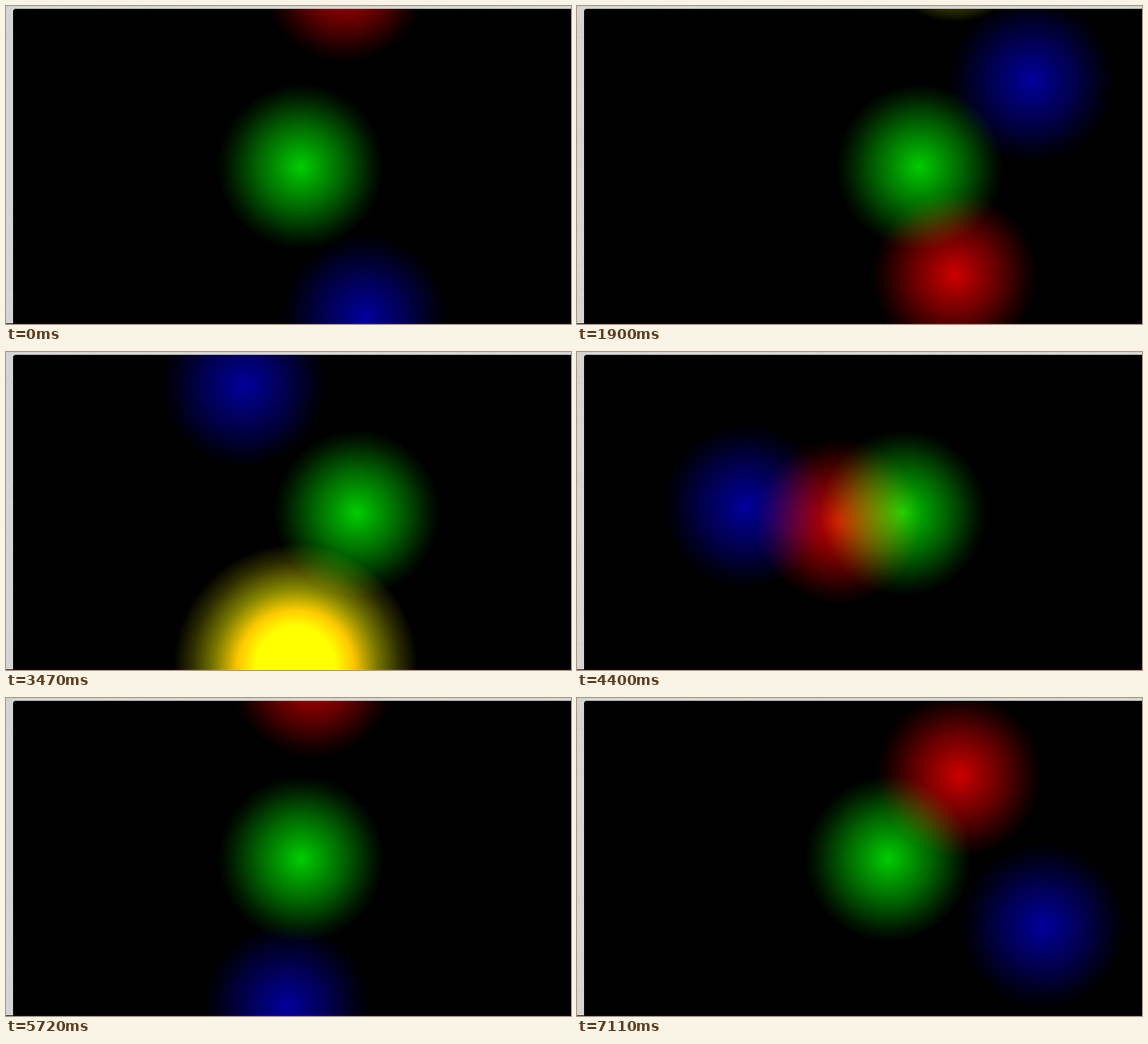
These frames come from a looping animation (800x451 px, 7200 ms). An HTML page with a canvas:

```html
<!DOCTYPE html>
<html lang="en">
<head>
<meta charset="utf-8">
<title>Orbiting lights</title>
<style>
  html, body { margin: 0; width: 100%; height: 100%; overflow: hidden; background: #000; }
  canvas { display: block; width: 800px; height: 451px; }
</style>
</head>
<body>
<canvas id="stage" width="800" height="451"></canvas>
<script>
const ctx = document.getElementById('stage').getContext('2d');
const WIDTH = 800, HEIGHT = 451, LOOP = 7200;
const CENTER = { x: 460, y: 228 };

// Start of every tenth step; the steps between are evenly spaced.
const marks = [70, 830, 1590, 2370, 3150, 3940, 4720, 5510, 6250, 7030, 7810];

function stepAt(time) {
  const t = time + 12;
  if (t < marks[0]) return 0;
  const i = marks.findIndex((start, n) => t >= start && t < marks[n + 1]);
  return 1 + i * 10 + Math.floor((t - marks[i]) / (marks[i + 1] - marks[i]) * 10);
}

function makeBackdrop() {
  const layer = document.createElement('canvas');
  layer.width = WIDTH;
  layer.height = HEIGHT;
  const g = layer.getContext('2d');
  g.fillStyle = '#d3d6d4';
  g.fillRect(0, 0, WIDTH, HEIGHT);

  let seed = 7;
  const random = () => (seed = seed * 16807 % 2147483647) / 2147483647;
  const fleck = (x, y) => {
    const shade = 198 + Math.floor(random() * 26);
    g.strokeStyle = `rgba(${shade},${shade + 2},${shade},0.6)`;
    g.beginPath();
    g.moveTo(x, y);
    g.lineTo(x + 3, y - 2);
    g.stroke();
  };
  for (let i = 0; i < 420; i++) fleck(random() * 10, random() * HEIGHT);
  for (let i = 0; i < 300; i++) fleck(random() * WIDTH, random() * 5);

  g.fillStyle = '#000';
  g.fill(panel);
  g.fillStyle = '#1c0812';
  g.fillRect(0, 450, WIDTH, 1);
  return layer;
}

const panel = new Path2D('M10 451V8Q10 4 14 4H800V451Z');
const backdrop = makeBackdrop();

// Brightness over distance from the middle, both as fractions.
const falloff = [[0, 1], [0.32, 0.68], [0.5, 0.5], [0.85, 0.12], [1, 0]];

function light(x, y, radius, red, green, blue) {
  const gradient = ctx.createRadialGradient(x, y, 0, x, y, radius);
  for (const [distance, level] of falloff) {
    const rgb = [red, green, blue].map(v => Math.min(255, Math.round(v * level)));
    gradient.addColorStop(distance, `rgb(${rgb})`);
  }
  ctx.fillStyle = gradient;
  ctx.beginPath();
  ctx.arc(x, y, radius, 0, Math.PI * 2);
  ctx.fill();
}

function draw(time) {
  const angle = (-77.6 + 4.475 * stepAt(time)) * Math.PI / 180;
  const cos = Math.cos(angle), sin = Math.sin(angle);
  const { x, y } = CENTER;

  ctx.drawImage(backdrop, 0, 0);
  ctx.save();
  ctx.clip(panel);
  ctx.globalCompositeOperation = 'lighter';
  light(x + 44 * sin, y, 118, 0, 205, 0);
  light(x + 90 * cos, y + 272 * sin, 118, 205, 0, 0);
  light(x + 222 * cos, y - 218 * sin, 118, 0, 0, 155);
  // The yellow light shines only while it is in front of the wall.
  if (sin > 0.05) light(x + 90 * cos, y - 390 * cos, 208 * sin, 375, 375, 0);
  ctx.restore();
}

const begin = performance.now();
function tick() {
  draw((performance.now() - begin) % LOOP);
  requestAnimationFrame(tick);
}
tick();
</script>
</body>
</html>
```
